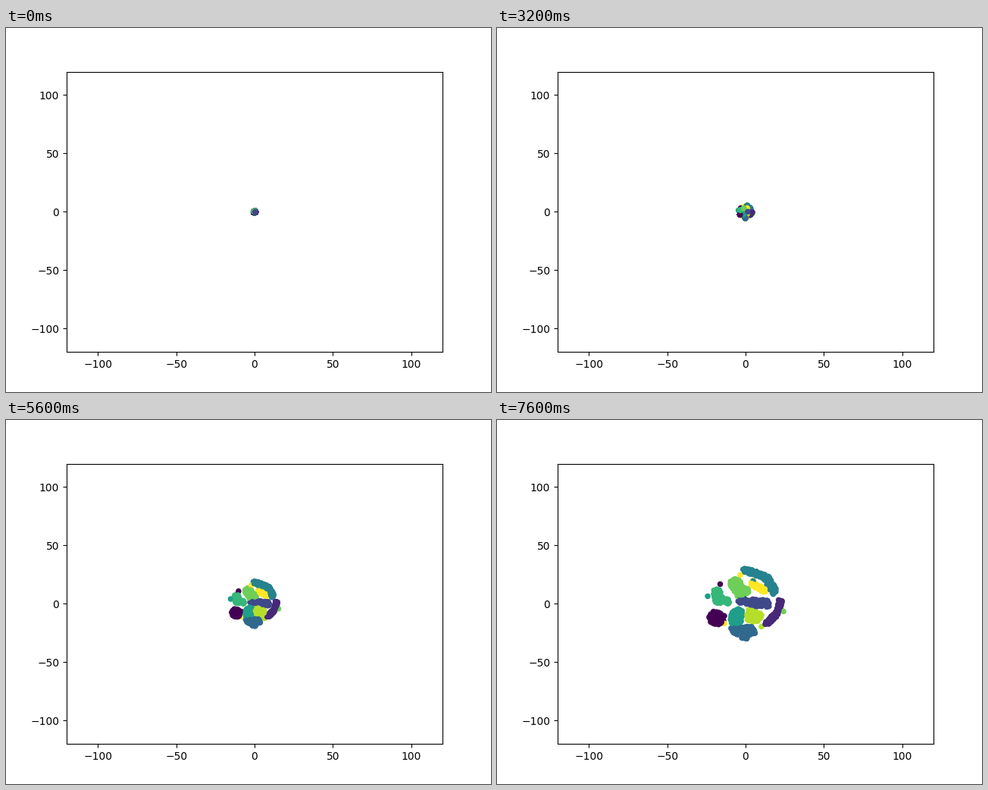
These frames come from a looping animation (640x480 px, 8000 ms). A matplotlib script:

```python
import numpy as np
import matplotlib.pyplot as plt
from matplotlib.animation import FuncAnimation

FRAMES, INTERVAL, LIMIT = 20, 400, 120
UNITS = np.array([2 * LIMIT / 496, -2 * LIMIT / 369.6])  # data units per pixel
DENSITY = 0.45
rng = np.random.default_rng(4)

# Label, brush radius, then both ends of a stroke in pixels from the middle.
GROUPS = [
    (0, 8.5, -40, 18, -37, 20),
    (1, 3, 46, -4, 43, 9),
    (1, 3, 41, 13, 28, 26),
    (2, 5, 4, -2, 28, 0),
    (2, 3, -8, -4, 0, -4),
    (3, 6, -15, 36, 9, 35),
    (3, 3, -6, 43, 2, 43),
    (4, 3, -2, -45, 26, -36),
    (4, 4, 28, -34, 38, -16),
    (5, 7.5, -11, 12, -13, 23),
    (6, 5, -38, -16, -36, -4),
    (6, 3, -32, -7, -23, -3),
    (7, 7, -14, -28, -8, -17),
    (7, 4, -10, -13, 2, -18),
    (8, 7, 7, 16, 13, 18),
    (8, 3.5, 4, 10, 19, 16),
    (9, 3, 8, -28, 14, -23),
    (9, 3, 19, -21, 26, -18),
]
STRAYS = [
    (0, -33.5, -26), (0, -28, 16), (5, -50, -10), (7, 50, 10),
    (9, -7, -38), (9, -28, 26), (4, 10, -30), (8, 21, 30),
]
TOP_ORDER = [4, 8, 3, 5, 9, 1, 0, 6, 7, 2]  # last one lies in front


def brush(radius, start, end):
    """Points spread evenly over a straight stroke with a round brush."""
    area = np.pi * radius**2 + 2 * radius * np.hypot(*(end - start))
    count = int(DENSITY * area)
    angle = rng.uniform(0, 2 * np.pi, count)
    reach = radius * np.sqrt(rng.uniform(0, 1, count))
    along = rng.uniform(0, 1, (count, 1))
    jitter = np.column_stack([np.cos(angle), np.sin(angle)]) * reach[:, None]
    return start + along * (end - start) + jitter


def build():
    """Hubs, offsets from the hubs and labels, in drawing order."""
    strays = np.array(STRAYS)
    hubs, offsets, labels = [strays[:, 1:]], [np.zeros((len(strays), 2))], [strays[:, 0]]
    fronts = {}
    for label, radius, *ends in GROUPS:
        start, end = np.reshape(ends, (2, 2))
        points = brush(radius, start, end)
        hub = (start + end) / 2
        fronts.setdefault(label, hub)
        hubs.append(np.tile(hub, (len(points), 1)))
        offsets.append(points - hub)
        labels.append(np.full(len(points), label))
    hubs, offsets, labels = np.vstack(hubs), np.vstack(offsets), np.hstack(labels)
    order = rng.permutation(len(labels))
    tops = [fronts[label] for label in TOP_ORDER]
    return (
        np.vstack([hubs[order], tops]),
        np.vstack([offsets[order], np.zeros((len(tops), 2))]),
        np.hstack([labels[order], TOP_ORDER]),
    )


def growth(frame, lag):
    """Steady growth from 0 to 1 after the tightly packed phase."""
    u = (frame - 9) / 10
    return u**0.85 - lag * np.exp(-5.5 * u)


def scales(frame):
    if frame < 3:
        return np.array([0.03, 0.063, 0.145])[[frame, frame]]
    rest = (min(frame, 9) - 3) / 6
    packed = np.array([0.195 - 0.01 * rest, 0.18 + 0.015 * rest])
    if frame <= 9:
        return packed
    return packed + (1 - packed) * growth(frame, np.array([0.13, 0.04]))


def spread(frame):
    if frame <= 9:
        return 0.3 if frame < 2 else 0.14
    return 1 - 0.9 * np.exp(-0.6 * (frame - 9))


def positions(frame):
    return (hubs + offsets * spread(frame)) * scales(frame) * UNITS


hubs, offsets, labels = build()

fig, ax = plt.subplots(figsize=(6.4, 4.8), dpi=100)
ax.set_xlim(-LIMIT, LIMIT)
ax.set_ylim(-LIMIT, LIMIT)
ticks = range(-100, 101, 50)
ax.set_xticks(ticks)
ax.set_yticks(ticks)
dots = ax.scatter(*positions(0).T, c=labels, s=20, cmap="viridis", vmin=0, vmax=9)


def update(frame):
    dots.set_offsets(positions(frame))
    return (dots,)


anim = FuncAnimation(fig, update, frames=FRAMES, interval=INTERVAL, repeat=True,
                     repeat_delay=0)
plt.show()
```
